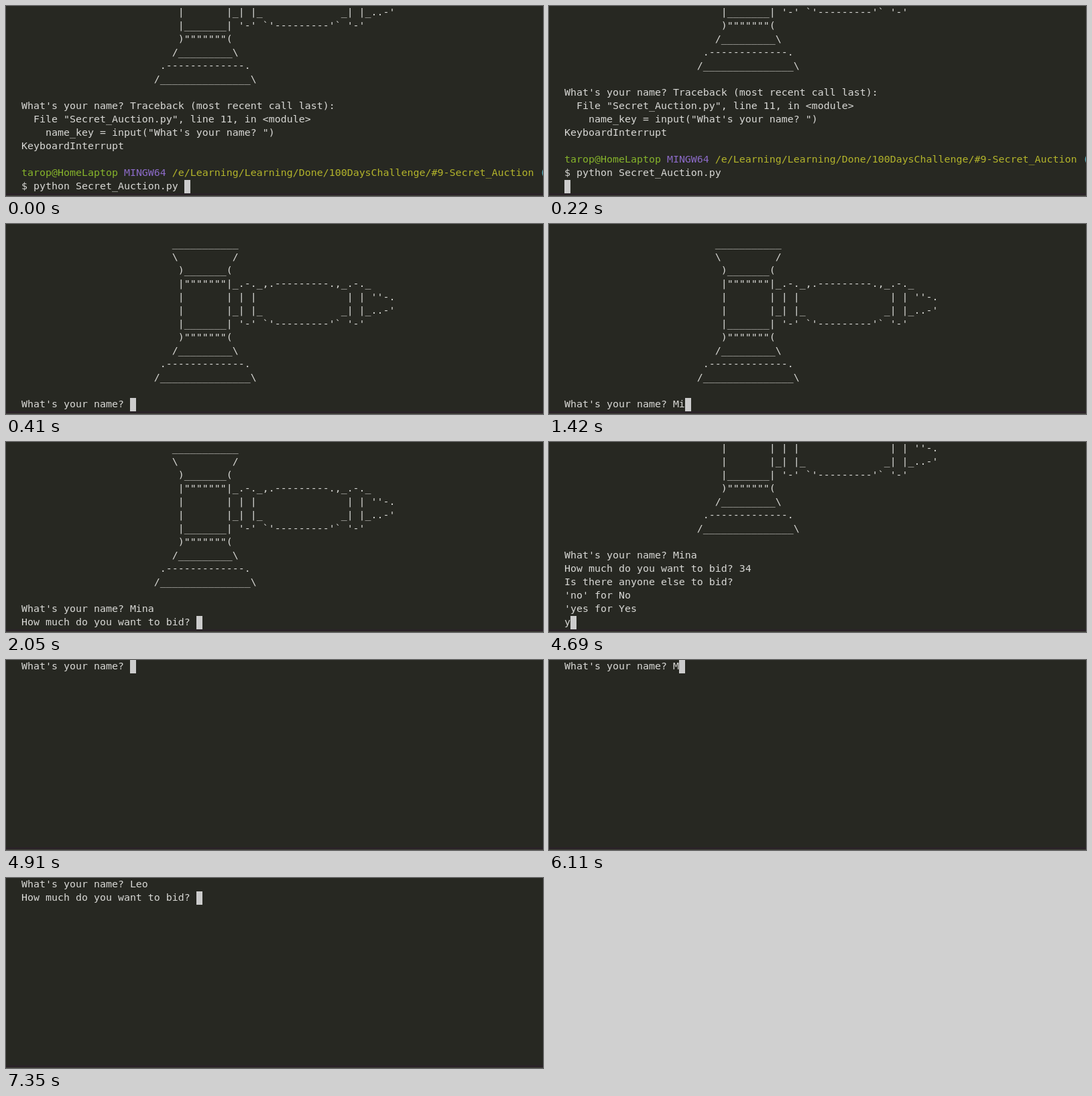
Recreate the animation shown at these times as an HTML page. Size 801 by 284 pixels, loop 8000 ms.

```html
<!DOCTYPE html>
<html lang="en">
<head>
<meta charset="utf-8">
<title>Secret auction terminal</title>
<style>
html, body { margin: 0; width: 100%; height: 100%; overflow: hidden; background: #272822; }
#stage { position: relative; width: 801px; height: 284px; overflow: hidden; }
#screen {
  position: absolute; left: 23px; top: -1px; margin: 0; color: #d8d8d5;
  font: 14.95px/20px "DejaVu Sans Mono", monospace;
  font-variant-ligatures: none;
}
#cursor { position: absolute; width: 9px; height: 20px; background: #ccc; }
#edge {
  position: absolute; top: 280px; width: 801px; height: 3px;
  background: #2a2328; border-bottom: 1px solid #414339;
}
.user { color: #86b42b; }
.system { color: #8c6bc8; }
.path { color: #b3b42b; }
.branch { color: #56adbc; }
</style>
</head>
<body>
<div id="stage">
  <pre id="screen"></pre>
  <div id="cursor"></div>
  <div id="edge"></div>
</div>
<script type="text/plain" id="gavel">
                         ___________
                         \         /
                          )_______(
                          |"""""""|_.-._,.---------.,_.-._
                          |       | | |               | | ''-.
                          |       |_| |_             _| |_..-'
                          |_______| '-' `'---------'` '-'
                          )"""""""(
                         /_________\
                       .-------------.
                      /_______________\
</script>
<script>
const LOOP = 8000, ROWS = 14, CELL = 9, LINE = 20, LEFT = 23;
const screen = document.getElementById("screen");
const cursor = document.getElementById("cursor");
const gavel = document.getElementById("gavel").textContent;

const askName = "What's your name? ";
const askBid = "\nHow much do you want to bid? ";
const shell = `${gavel}
${askName}Traceback (most recent call last):
  File "Secret_Auction.py", line 11, in &lt;module>
    name_key = input("What's your name? ")
KeyboardInterrupt

<span class="user">tarop@HomeLaptop</span> <span class="system">MINGW64</span> <span class="path">/e/Learning/Learning/Done/100DaysChallenge/#9-Secret_Auction</span> <span class="branch">(</span>
$ python Secret_Auction.py `;
const auction = gavel + "\n" + askName;
const firstBid = auction + "Mina" + askBid;
const askMore = firstBid + "34\nIs there anyone else to bid?\n'no' for No\n'yes for Yes\n";

// Terminal contents from each time on
const steps = [
  [0, shell],
  [220, shell + "\n"],
  [410, auction],
  [1420, auction + "Mi"],
  [1640, auction + "Min"],
  [1840, auction + "Mina"],
  [2050, firstBid],
  [3060, firstBid + "34"],
  [3280, askMore],
  [4690, askMore + "y"],
  [4910, askName],
  [6110, askName + "M"],
  [6550, askName],
  [6750, askName + "L"],
  [6970, askName + "Leo"],
  [7350, askName + "Leo" + askBid],
];

let shown;

function show(text) {
  // The gavel text starts and ends with a newline, giving its blank margins
  const lines = text.split("\n").slice(-ROWS);
  screen.innerHTML = lines.map(line => line || " ").join("\n");
  cursor.style.left = LEFT + lines.at(-1).length * CELL + "px";
  cursor.style.top = (lines.length - 1) * LINE + "px";
}

function draw() {
  const time = performance.now() % LOOP;
  const text = steps.findLast(([start]) => start <= time)[1];
  if (text !== shown) show(shown = text);
  requestAnimationFrame(draw);
}
draw();
</script>
</body>
</html>
```
